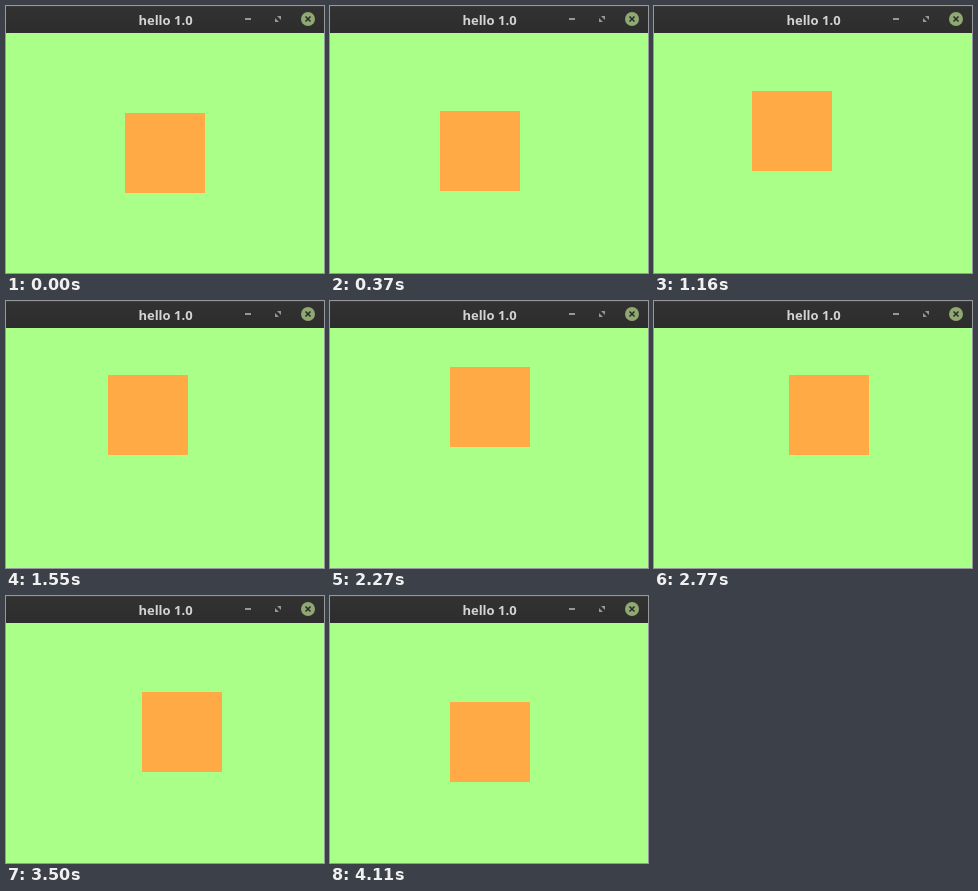
Recreate the animation shown at these times as an HTML page. Size 318 by 267 pixels, loop 4130 ms.

```html
<!DOCTYPE html>
<html lang="en">
<head>
<meta charset="utf-8">
<title>hello 1.0</title>
<style>
  html, body { margin: 0; width: 100%; height: 100%; overflow: hidden; background: #af8; }
  svg { display: block; }
  text { font: bold 13px "Open Sans", "Noto Sans", sans-serif; fill: #d3d3d3; }
</style>
</head>
<body>
<svg width="318" height="267" viewBox="0 0 318 267">
  <linearGradient id="bar" x2="0" y2="1">
    <stop stop-color="#323232"/>
    <stop offset="1" stop-color="#2d2d2d"/>
  </linearGradient>
  <rect width="318" height="267" fill="#af8"/>
  <rect width="318" height="27" fill="url(#bar)"/>
  <rect width="318" height="1" fill="#3b3b3b"/>
  <text x="159.5" y="19" text-anchor="middle">hello 1.0</text>
  <g fill="#989898">
    <rect x="239" y="12" width="6" height="2"/>
    <path d="M271 10h4v4zM269 12v4h4z"/>
  </g>
  <circle cx="302" cy="13" r="7" fill="#90a872"/>
  <path d="M299.5 10.5l5 5m0-5l-5 5" stroke="#2d2d2d" stroke-width="1.6"/>
  <rect id="box" width="80" height="80" fill="#fa4"/>
</svg>
<script>
const LOOP = 4130, START = -2, RADIUS = 20.3, CX = 118.6, CY = 86.8;

// Nearly steady turn with a short stall halfway: [ms, degrees]
const keys = [
  [100, 1], [1130, 91], [2180, 183], [2270, 185.8],
  [2770, 234.2], [3360, 286.6], [4110, 353.8]
];
const box = document.getElementById('box');
const origin = performance.now();

function angleAt(t) {
  if (t < keys[0][0]) return START;
  const next = keys.findIndex(([ms]) => ms > t);
  if (next < 0) return keys.at(-1)[1];
  const [t0, a0] = keys[next - 1], [t1, a1] = keys[next];
  return a0 + (a1 - a0) * (t - t0) / (t1 - t0);
}

function tick() {
  const a = angleAt((performance.now() - origin) % LOOP) * Math.PI / 180;
  box.setAttribute('x', Math.floor(CX - RADIUS * Math.sin(a)));
  box.setAttribute('y', Math.floor(CY + RADIUS * Math.cos(a)));
  requestAnimationFrame(tick);
}

tick();
</script>
</body>
</html>
```
